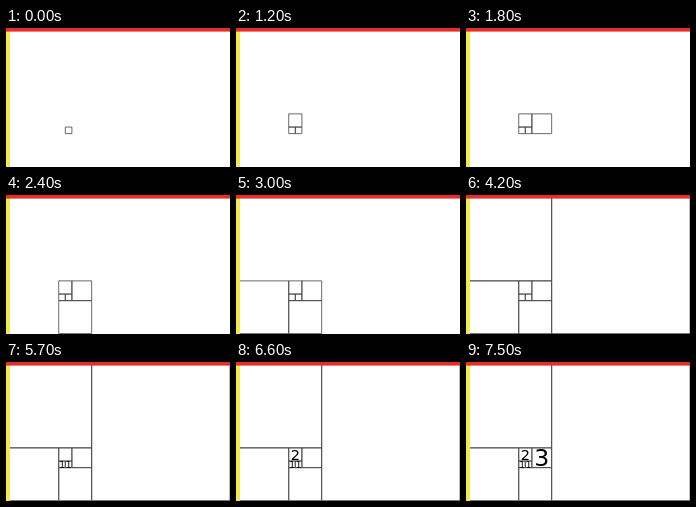
These frames come from a looping animation (224 by 139 pixels, 8 s). An HTML page:

```html
<!DOCTYPE html>
<html>
<head>
<meta charset="utf-8">
<style>
html, body { margin: 0; width: 100%; height: 100%; overflow: hidden; background: #fff; }
svg { display: block; width: 224px; height: 139px; }
path { fill: none; stroke: #444; stroke-width: .8; }
text { font-family: "DejaVu Sans", sans-serif; text-anchor: middle; fill: #000; }
</style>
</head>
<body>
<svg viewBox="0 0 224 139">
  <g transform="translate(0 .2)">
    <path id="lines"/>
    <g id="labels"></g>
  </g>
  <rect y="3" width="4" height="136" fill="#f4e84f"/>
  <rect width="224" height="3.6" fill="#e62e29"/>
</svg>
<script>
const UNIT = 6.59, LOOP = 8000, SQUARES = 8, LABELS = 4;
const SQUARE_STEP = 600, LABEL_START = 4800, LABEL_STEP = 900;
const GOLDEN = (1 + Math.sqrt(5)) / 2;
const lines = document.getElementById('lines');
const labels = document.getElementById('labels');

// Each new square lies along a side of the box around the earlier ones:
// left, up, right, down, and so on.
function fibonacciSquares(count) {
  const box = { x: 9, y: 15, w: 1, h: 1 };
  const squares = [{ x: box.x, y: box.y, size: 1 }];
  for (let i = 0; i < count - 1; i++) {
    const sideways = i % 2 === 0, before = i % 4 < 2;
    const size = sideways ? box.h : box.w;
    const [pos, len] = sideways ? ['x', 'w'] : ['y', 'h'];
    const square = { x: box.x, y: box.y, size };
    square[pos] += before ? -size : box[len];
    box[pos] = Math.min(box[pos], square[pos]);
    box[len] += size;
    squares.push(square);
  }
  return squares;
}

const squares = fibonacciSquares(SQUARES);

const outlines = squares.map(({ x, y, size }) => {
  const side = size * UNIT;
  return `M${x * UNIT} ${y * UNIT}h${side}v${side}h${-side}z`;
});

for (const { x, y, size } of squares.slice(0, LABELS)) {
  const el = document.createElementNS('http://www.w3.org/2000/svg', 'text');
  const fontSize = 9 * GOLDEN ** (size - 1);
  el.setAttribute('x', (x + size / 2) * UNIT);
  el.setAttribute('y', (y + size / 2) * UNIT + fontSize * 0.365);
  el.setAttribute('font-size', fontSize);
  el.textContent = size;
  labels.append(el);
}

const start = performance.now();
function draw() {
  const t = (performance.now() - start) % LOOP;
  // One path, so that shared edges are painted once
  lines.setAttribute('d', outlines.slice(0, Math.floor(t / SQUARE_STEP) + 1).join(''));
  [...labels.children].forEach((el, i) => {
    el.style.display = t >= LABEL_START + i * LABEL_STEP ? '' : 'none';
  });
  requestAnimationFrame(draw);
}
draw();
</script>
</body>
</html>
```
